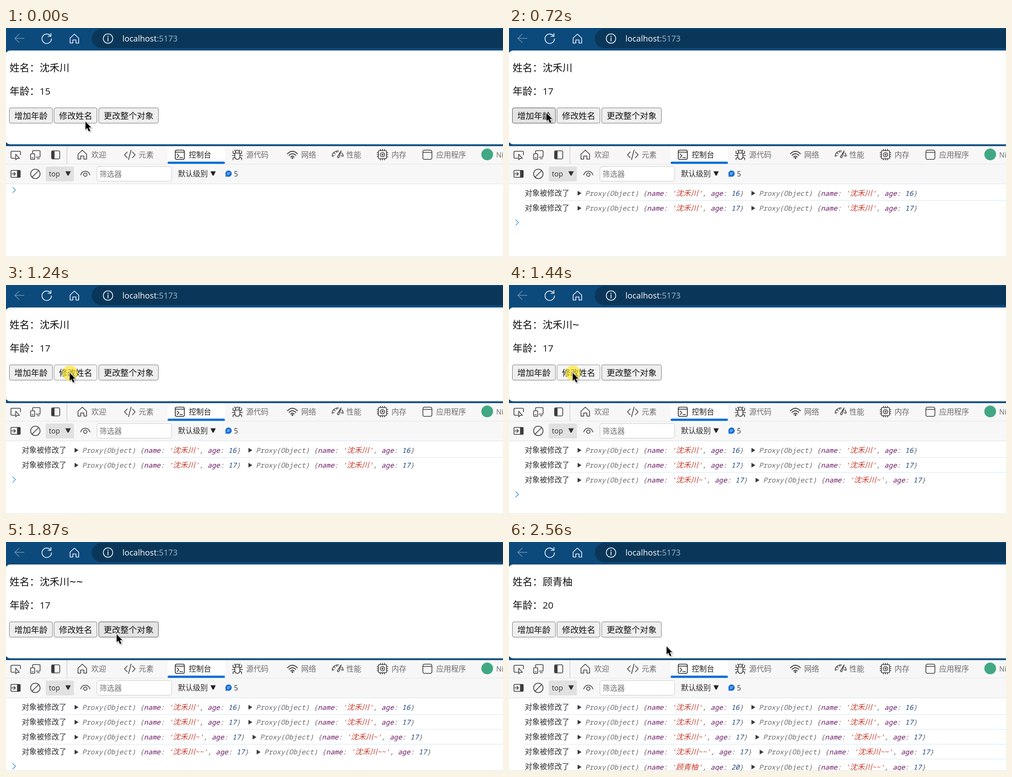
An HTML page with a canvas that plays this animation: 1101 px wide and 509 px high, repeating every 2.59 s.

```html
<!DOCTYPE html>
<html lang="zh-CN">
<head>
<meta charset="utf-8">
<title>Console demo</title>
<style>
  html, body { margin: 0; width: 100%; height: 100%; overflow: hidden; background: #fff; }
  canvas { display: block; }
</style>
</head>
<body>
<canvas id="stage" width="1101" height="509"></canvas>
<script>
const ctx = document.getElementById('stage').getContext('2d');
const LOOP = 2590;
const HAN = "'Noto Sans CJK SC', 'Noto Sans CJK', sans-serif";
const LATIN = "'Open Sans', 'Noto Sans', sans-serif";
const MONO = "'Noto Sans Mono', 'DejaVu Sans Mono', monospace";
const NAVY = '#0c4a7c', INK = '#3b3b3b', GREY = '#6c6c6c';
const CELL = 9.14, HAN_SIZE = 16.5, ROW = 33.2;

const people = [
  { name: '沈禾川', waves: '', age: 15 },
  { name: '沈禾川', waves: '', age: 16 },
  { name: '沈禾川', waves: '', age: 17 },
  { name: '沈禾川', waves: '~', age: 17 },
  { name: '沈禾川', waves: '~~', age: 17 },
  { name: '顾青柚', waves: '', age: 20 }
];
const clicks = [[370, 430], [660, 720], [1180, 1270], [1440, 1530], [2150, 2220]];

const smooth = p => p * p * (3 - 2 * p);
const easeOut = p => 1 - (1 - p) ** 3;
const origin = [176, 208];
const moves = [
  { from: 30, to: 190, steps: 5, at: [83, 189], ease: smooth },
  { from: 870, to: 1080, steps: 8, at: [141, 195], ease: easeOut },
  { from: 1680, to: 1870, steps: 7, at: [245, 205], ease: smooth },
  { from: 1900, to: 1960, steps: 3, at: [252, 200], ease: easeOut },
  { from: 2510, to: 2560, steps: 3, at: [349, 232], ease: smooth }
];
const buttons = [
  { x: 7.5, w: 95.5, label: '增加年龄' },
  { x: 106.5, w: 95, label: '修改姓名' },
  { x: 205.5, w: 132, label: '更改整个对象' }
];

// The pointer is sampled in discrete steps.
function pointerAt(t) {
  let pos = origin;
  for (const m of moves) {
    if (t < m.from) break;
    const gap = (m.to - m.from) / (m.steps - 1);
    const k = Math.min(m.steps, Math.floor((t - m.from) / gap + 1e-6) + 1);
    const p = m.ease(k / m.steps);
    pos = pos.map((v, i) => v + (m.at[i] - v) * p);
  }
  return pos.map(Math.round);
}

function rect(x, y, w, h, color) {
  ctx.fillStyle = color;
  ctx.fillRect(x, y, w, h);
}

function box(x, y, w, h, r, fill, stroke) {
  ctx.beginPath();
  ctx.roundRect(x, y, w, h, r);
  if (fill) { ctx.fillStyle = fill; ctx.fill(); }
  if (stroke) { ctx.strokeStyle = stroke; ctx.lineWidth = 1; ctx.stroke(); }
}

function disc(x, y, r, color) {
  ctx.beginPath();
  ctx.arc(x, y, r, 0, 7);
  ctx.fillStyle = color;
  ctx.fill();
}

function line(d, color = INK, width = 1.6) {
  ctx.strokeStyle = color;
  ctx.lineWidth = width;
  ctx.stroke(new Path2D(d));
}

function shape(d, color = INK) {
  ctx.fillStyle = color;
  ctx.fill(new Path2D(d));
}

function ring(x, y, r, color = INK, width = 1.6) {
  line(`M${x - r} ${y}a${r} ${r} 0 1 0 ${2 * r} 0a${r} ${r} 0 1 0 ${-2 * r} 0`, color, width);
}

function type(str, x, base, font, color) {
  ctx.font = font;
  ctx.fillStyle = color;
  ctx.fillText(str, x, base);
}

function han(str, x, mid, size, color) {
  type(str, x, mid + size * 0.375, `${size}px ${HAN}`, color);
}

function latin(str, x, base, size, color) {
  type(str, x, base, `${size}px ${LATIN}`, color);
}

function home(x, y, color) {
  line(`M${x - 9.5} ${y - 1}L${x} ${y - 10}L${x + 9.5} ${y - 1}V${y + 10}H${x + 3.5}V${y + 3}H${x - 3.5}V${y + 10}H${x - 9.5}Z`, color);
}

function drawBrowserBar() {
  rect(0, 0, 1101, 263, NAVY);
  box(190, 2, 950, 43, 21.5, '#0a3759');
  line('M40 23H20M29 14L19.5 23L29 32', '#7394b0', 1.5);
  line('M98.5 17.5A10.5 10.5 0 1 0 100.7 24M99.5 12V18.5H93', '#f4f8fb', 1.7);
  home(151.5, 23.5, '#f4f8fb');
  ring(226, 23.5, 10.5, '#f4f8fb');
  line('M226 22V29', '#f4f8fb', 1.8);
  disc(226, 18.5, 1.3, '#f4f8fb');
  latin('localhost', 258, 30, 18.1, '#ffffff');
  latin(':5173', 334, 30, 18.1, '#a3b6c7');
}

function drawPage(person, t, pointer, pressed) {
  box(-1, 50, 1120, 208.5, 10, '#ffffff');
  han('姓名：', 8, 87.5, 22, '#111');
  han(person.name, 74.5, 87.5, 22, '#111');
  [...person.waves].forEach((c, i) => latin(c, 140.5 + 14.9 * i, 97.3, 26, '#111'));
  han('年龄：', 8, 140, 22, '#111');
  latin(person.age, 74.5, 148, 20.8, '#111');

  for (const b of buttons) {
    const over = pointer[0] >= b.x && pointer[0] <= b.x + b.w && pointer[1] >= 178 && pointer[1] < 208;
    const [fill, edge] = !over ? ['#efefef', '#767676'] : pressed ? ['#f5f5f5', '#8d8d8d'] : ['#e4e4e4', '#4f4f4f'];
    box(b.x, 177.5, b.w, 34, 3.5, fill, edge);
    han(b.label, b.x + 11, 195, 18.4, '#111');
  }
}

function drawTabs() {
  rect(0, 262.5, 1101, 84, '#f7f7f7');
  rect(358, 263, 127, 38, '#ffffff');
  rect(0, 302, 1101, 1, '#e3e5e8');
  box(358, 297, 127, 5, 2.5, '#0a70d4');
  rect(134.5, 263, 1, 39, '#b9bcc0');

  // inspect, device and dock toggles
  line('M20 289.5H13A2 2 0 0 1 11 287.5V276A2 2 0 0 1 13 274H30A2 2 0 0 1 32 276V282');
  line('M21.5 280.5V293L24.8 289.8H29.8Z', INK, 1.5);
  line('M59 278V274A1.5 1.5 0 0 1 60.5 272.5H74A1.5 1.5 0 0 1 75.5 274V285.5A1.5 1.5 0 0 1 74 287H67M69 290.5H74');
  line('M56 279.5H62A1.5 1.5 0 0 1 63.5 281V290.5A1.5 1.5 0 0 1 62 292H56A1.5 1.5 0 0 1 54.5 290.5V281A1.5 1.5 0 0 1 56 279.5ZM57.5 288.5H60.5');
  line('M103.5 273H116.5A2.5 2.5 0 0 1 119 275.5V288.5A2.5 2.5 0 0 1 116.5 291H103.5A2.5 2.5 0 0 1 101 288.5V275.5A2.5 2.5 0 0 1 103.5 273Z');
  rect(101, 273.5, 6.5, 17, INK);

  home(169, 281.5, INK);
  line('M268.5 275.5L262.5 282L268.5 288.5M280 275.5L286 282L280 288.5M277 271.5L271.5 292.5');
  // console
  line('M378 271.5H392A3 3 0 0 1 395 274.5V289A3 3 0 0 1 392 292H378A3 3 0 0 1 375 289V274.5A3 3 0 0 1 378 271.5ZM375 276H395M379 280L383 284L379 288M385 288H391', '#1f1f1f');
  // bug
  line('M507 278H518V286.5A5.5 5.5 0 0 1 507 286.5ZM508.5 278V275.5A4 4 0 0 1 516.5 275.5V278M507 271V273L509 274.5M518 271V273L516 274.5M507 280L503 278.5V273.5M518 280L522 278.5V273.5M501 283.5H507M518 283.5H524M507 287.5L503 289V293M518 287.5L522 289V293');
  // network
  line('M623.5 279.5Q634.5 268.5 645.5 279.5M627 283.2Q634.5 275.7 642 283.2M630.5 286.8Q634.5 282.8 638.5 286.8', INK, 1.8);
  disc(634.5, 289, 2, INK);
  // performance
  line('M722.5 285A12 12 0 0 1 737 273.5M744 277.5A12 12 0 0 1 747 285M726 277L729.5 280M733 273V277M722.5 285L727 283.5M742 284L747 285');
  line('M742.5 273L734 286.5A2.3 2.3 0 0 0 737.5 288Z', INK, 1.5);
  // memory
  line('M827 272.5H841A2 2 0 0 1 843 274.5V288.5A2 2 0 0 1 841 290.5H827A2 2 0 0 1 825 288.5V274.5A2 2 0 0 1 827 272.5ZM829.5 269.5V272.5M834 269.5V272.5M838.5 269.5V272.5M829.5 290.5V293.5M834 290.5V293.5M838.5 290.5V293.5M822 277H825M822 281.5H825M822 286H825M843 277H846M843 281.5H846M843 286H846');
  ring(834, 281.5, 4.8);
  ring(834, 281.5, 1.5, INK, 1.3);
  // application
  line('M927 271.5H940A3.5 3.5 0 0 1 943.5 275V288.5A3.5 3.5 0 0 1 940 292H927A3.5 3.5 0 0 1 923.5 288.5V275A3.5 3.5 0 0 1 927 271.5ZM923.5 276.5H943.5');
  disc(1066, 281, 13, '#41a883');

  const tabs = [['欢迎', 189], ['元素', 294], ['控制台', 405], ['源代码', 532], ['网络', 654], ['性能', 754], ['内存', 854], ['应用程序', 953]];
  for (const [label, x] of tabs) han(label, x, 282, HAN_SIZE, x === 405 ? '#1f1f1f' : GREY);
  latin('Ni', 1086, 288, 15.5, GREY);
}

function drawToolbar() {
  rect(0, 346, 1101, 1, '#d6dfea');
  line('M12.5 316.5H30A1.5 1.5 0 0 1 31.5 318V330.5A1.5 1.5 0 0 1 30 332H12.5A1.5 1.5 0 0 1 11 330.5V318A1.5 1.5 0 0 1 12.5 316.5Z');
  rect(24.5, 316.5, 7, 15.5, INK);
  line('M13 324.2H20.5M17.5 320.8L21 324.2L17.5 327.6');
  ring(65, 324.2, 10.5);
  line('M72.4 316.8L57.6 331.6');
  box(88, 308, 62.5, 33, 3, '#e1e1e1');
  latin('top', 95, 330, 15.6, '#333');
  shape('M131.5 318.5H143.5L139 327.3Q137.5 329 136 327.3Z', '#333');
  line('M165.5 326.5C169 315.5 182 315.5 186 326.5');
  ring(175.7, 326, 3.8);
  box(201.5, 308, 165.5, 32.5, 4.5, '#ffffff', '#c8c8c8');
  han('筛选器', 207, 325, HAN_SIZE, '#757575');
  han('默认级别', 381, 324.3, HAN_SIZE, '#2c2c2c');
  shape('M453 318.5H464.7L460.3 327.3Q458.8 329 457.4 327.3Z', '#222');
  disc(493, 323.8, 7, '#0f6bd6');
  shape('M486.5 325V331L492 329.5Z', '#0f6bd6');
  line('M490 322.3H496.3M490 325.6H494', '#e8f2ff', 1.3);
  latin('5', 505, 329.8, 15.7, '#333');
}

// Lays out one object preview and returns its right edge.
function drawObject(person, x, y) {
  shape(`M${x + 0.5} ${y - 5}L${x + 9} ${y + 0.3}L${x + 0.5} ${y + 5.6}Z`, '#3a3a3a');
  x += 17;
  const put = (str, color) => {
    for (const c of str) {
      const wide = c.charCodeAt(0) > 255;
      type(c, x, y + 5.8, wide ? `italic ${HAN_SIZE}px ${HAN}` : `italic 15.23px ${MONO}`, color);
      x += wide ? HAN_SIZE : CELL;
    }
  };
  put('Proxy(Object) {', GREY);
  put('name', '#6a1a66');
  put(': ', GREY);
  put(`'${person.name}${person.waves}'`, '#c63a2c');
  put(', ', GREY);
  put('age', '#6a1a66');
  put(': ', GREY);
  put(String(person.age), '#17407f');
  put('}', GREY);
  return x;
}

function drawConsole(count) {
  rect(0, 347, 1101, 162, '#ffffff');
  ctx.save();
  ctx.beginPath();
  ctx.rect(0, 347, 1101, 161);
  ctx.clip();
  for (let i = 0; i < count; i++) {
    const y = 367 + ROW * i;
    if (i) rect(35, Math.round(y - 17.5), 1066, 1, '#d5e5fa');
    han('对象被修改了', 35, y - 0.6, HAN_SIZE, '#2f2f2f');
    const now = people[i + 1];
    const before = now.name === people[i].name ? now : people[i];
    const end = drawObject(now, 151.5, y);
    drawObject(before, end + 17, y);
  }
  const py = count ? 365.8 + ROW * count : 360;
  line(`M15 ${py - 6}L21 ${py}L15 ${py + 6}`, '#4a9fdb', 1.6);
  ctx.restore();
  rect(0, 508, 1101, 1, '#dfe1e4');
}

function drawPointer([x, y], pressed) {
  if (pressed) disc(x + 1, y + 1, 17, 'rgba(255, 230, 25, 0.62)');
  ctx.save();
  ctx.translate(x, y);
  const arrow = new Path2D('M0 0V17.8L4 14.2L7.3 21.8L10.6 20.4L7.3 13.1H12.6Z');
  ctx.shadowColor = 'rgba(0, 0, 0, 0.35)';
  ctx.shadowBlur = 3;
  ctx.shadowOffsetX = ctx.shadowOffsetY = 1.5;
  ctx.strokeStyle = '#fff';
  ctx.lineWidth = 2;
  ctx.stroke(arrow);
  ctx.shadowColor = 'transparent';
  ctx.fillStyle = '#000';
  ctx.fill(arrow);
  ctx.restore();
}

function draw(t) {
  const count = clicks.filter(c => t >= c[1]).length;
  const pressed = clicks.some(c => t >= c[0] && t < c[1]);
  const pointer = pointerAt(t);
  drawBrowserBar();
  drawPage(people[count], t, pointer, pressed);
  drawTabs();
  drawToolbar();
  drawConsole(count);
  drawPointer(pointer, pressed);
}

const start = performance.now();
function tick() {
  draw((performance.now() - start) % LOOP);
  requestAnimationFrame(tick);
}
ctx.lineJoin = 'round';
ctx.lineCap = 'round';
tick();
</script>
</body>
</html>
```
